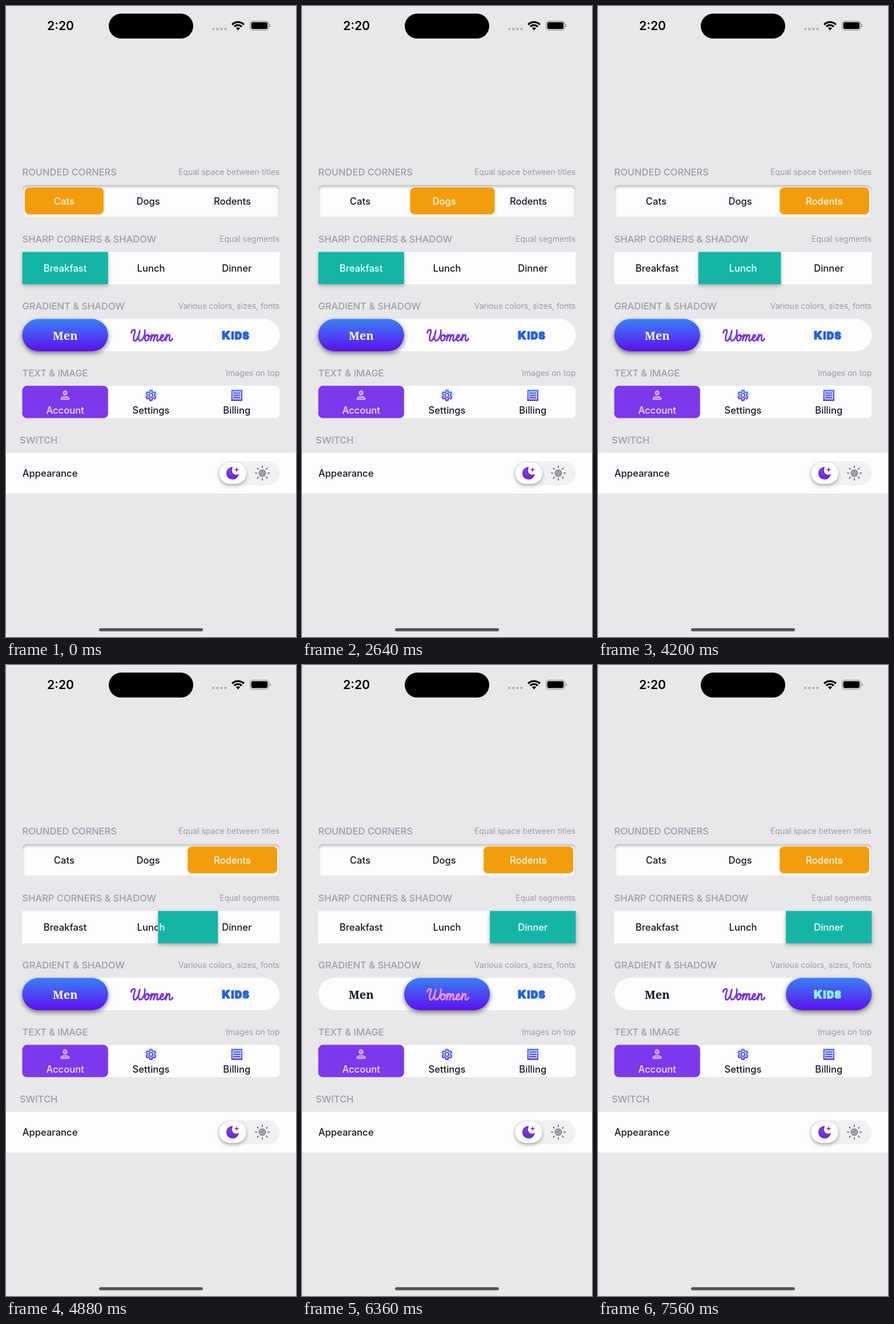
Recreate the animation shown at these times as an HTML page with a canvas. Size 508 by 1102 pixels, loop 8 s.

```html
<!DOCTYPE html>
<html lang="en">
<head>
<meta charset="utf-8">
<title>Segmented controls</title>
<style>
html, body { margin: 0; width: 100%; height: 100%; overflow: hidden; background: #e8e7e9; }
canvas { display: block; width: 508px; height: 1102px; }
</style>
</head>
<body>
<canvas id="stage"></canvas>
<script>
const W = 508, H = 1102, LOOP = 8000, STEP = 40;
const canvas = document.getElementById('stage');
const ratio = window.devicePixelRatio || 1;
canvas.width = W * ratio;
canvas.height = H * ratio;
const c = canvas.getContext('2d');

const INK = '#141925', MUTED = '#9a9ca9', PAPER = '#fdfcff';
const LABEL = '500 16.6px Inter, sans-serif';
const LEFT = 28.5, RIGHT = 479.5, SEG = (RIGHT - LEFT) / 3;
const CENTERS = [103.6, 254, 404.3];

// Each move: first visible step, start of its curve, duration, control, target segment
const MOVES = [
  { show: 1440, start: 1340, dur: 350, row: 'round', to: 1 },
  { show: 2640, start: 2554, dur: 350, row: 'round', to: 2 },
  { show: 3960, start: 3942, dur: 300, row: 'sharp', to: 1 },
  { show: 4760, start: 4742, dur: 300, row: 'sharp', to: 2 },
  { show: 6040, start: 6022, dur: 320, row: 'fancy', to: 1 },
  { show: 7240, start: 7222, dur: 320, row: 'fancy', to: 2 }
];

const lerp = (a, b, p) => a + (b - a) * p;

// cubic-bezier(.42, 0, .58, 1)
function easeInOut(x) {
  if (x <= 0) return 0;
  if (x >= 1) return 1;
  let lo = 0, hi = 1, s = .5;
  for (let i = 0; i < 20; i++) {
    s = (lo + hi) / 2;
    const bx = 1.26 * s * (1 - s) ** 2 + 1.74 * s * s * (1 - s) + s ** 3;
    if (bx < x) lo = s; else hi = s;
  }
  return 3 * s * s - 2 * s ** 3;
}

function position(row, t) {
  let pos = 0;
  for (const m of MOVES) {
    if (m.row === row && t >= m.show) pos = m.to - 1 + easeInOut((t - m.start) / m.dur);
  }
  return pos;
}

function box(x, y, w, h, r) {
  c.beginPath();
  c.roundRect(x, y, w, h, r);
}

function fillBox(x, y, w, h, r, fill) {
  box(x, y, w, h, r);
  c.fillStyle = fill;
  c.fill();
}

function disc(x, y, r, fill) {
  c.beginPath();
  c.arc(x, y, r, 0, Math.PI * 2);
  c.fillStyle = fill;
  c.fill();
}

function text(str, x, y, font, fill, align = 'center') {
  c.font = font;
  c.textAlign = align;
  c.fillStyle = fill;
  c.fillText(str, x, y);
}

function vertical(y0, y1, a, b) {
  const g = c.createLinearGradient(0, y0, 0, y1);
  g.addColorStop(0, a);
  g.addColorStop(1, b);
  return g;
}

function withShadow(dy, blur, alpha, draw) {
  c.save();
  c.shadowColor = `rgba(0,0,0,${alpha})`;
  c.shadowBlur = blur * ratio;
  c.shadowOffsetY = dy * ratio;
  draw();
  c.restore();
}

function header(title, note, y, x = LEFT) {
  text(title, x, y + 5.9, '500 16.5px Inter, sans-serif', MUTED, 'left');
  text(note, RIGHT - .3, y + 4.8, '400 14px Inter, sans-serif', MUTED, 'right');
}

// Dark labels, then the thumb, then light labels only inside the thumb
function control(x, y, w, h, r, paint, labels) {
  labels(false);
  paint();
  c.save();
  box(x, y, w, h, r);
  c.clip();
  labels(true);
  c.restore();
}

function statusBar() {
  text('2:20', 95.5, 42.4, '600 21.2px Inter, sans-serif', '#000');
  fillBox(180, 13.3, 148, 43.5, 21.8, '#000');
  for (let i = 0; i < 4; i++) fillBox(361 + i * 7.1, 38, 4.4, 4.4, 1.4, '#b4b3b6');

  c.strokeStyle = '#000';
  c.lineWidth = 3.3;
  for (const r of [14.4, 9.1]) {
    c.beginPath();
    c.arc(406.5, 42.5, r, -Math.PI * .755, -Math.PI * .245);
    c.stroke();
  }
  c.beginPath();
  c.moveTo(406.5, 42.5);
  c.arc(406.5, 42.5, 5.2, -Math.PI * .75, -Math.PI * .25);
  c.fillStyle = '#000';
  c.fill();

  box(427.6, 26.3, 32.6, 16, 5);
  c.strokeStyle = '#98979a';
  c.lineWidth = 1.3;
  c.stroke();
  fillBox(429.6, 28.3, 28.6, 12, 3.2, '#000');
  fillBox(461.6, 31.6, 1.8, 5.4, [0, 1.8, 1.8, 0], '#98979a');
}

function roundRow(t) {
  header('ROUNDED CORNERS', 'Equal space between titles', 290.5);
  const y = 312.8, h = 55.7, w = RIGHT - LEFT;
  fillBox(LEFT, y, w, h, 8, PAPER);
  c.save();
  box(LEFT, y, w, h, 8);
  c.clip();
  withShadow(2.5, 5, .3, () => {
    c.beginPath();
    c.rect(LEFT - 30, y - 30, w + 60, h + 60);
    c.roundRect(LEFT, y, w, h, 8);
    c.fillStyle = '#e8e7e9';
    c.fill('evenodd');
  });
  c.restore();

  const edges = [33, 171, 318.2, 475];
  const pos = position('round', t), i = Math.min(Math.floor(pos), 1), p = pos - i;
  const x = lerp(edges[i], edges[i + 1], p);
  const tw = lerp(edges[i + 1], edges[i + 2], p) - x;
  control(x, 317, tw, 47, 7.5,
    () => fillBox(x, 317, tw, 47, 7.5, '#f39d0a'),
    on => ['Cats', 'Dogs', 'Rodents'].forEach((s, k) =>
      text(s, [101.8, 249.2, 396.5][k], 346.6, LABEL, on ? '#fffaf0' : INK)));
}

function sharpRow(t) {
  header('SHARP CORNERS & SHADOW', 'Equal segments', 407.5);
  fillBox(LEFT, 429.5, RIGHT - LEFT, 56.5, 0, PAPER);
  // The thumb narrows halfway between segments
  const pos = position('sharp', t);
  const w = SEG * (1 - .31 * Math.abs(Math.sin(Math.PI * pos)));
  const x = LEFT + SEG * (pos + .5) - w / 2;
  control(x, 429.5, w, 56.5, 0,
    () => withShadow(3, 7, .3, () => fillBox(x, 429.5, w, 56.5, 0, '#14b5a7')),
    on => ['Breakfast', 'Lunch', 'Dinner'].forEach((s, k) =>
      text(s, CENTERS[k], 463.6, LABEL, on ? '#f2fffc' : INK)));
}

const SCRIPT = new Path2D(
  'M219.5 571C219.5 566 225 564 226 567C226 572 221 581 224.5 584.5C229 586 233 576 234.5 567' +
  'C232 575 231 583 234.5 584.5C240 584.5 244.5 573 243 566' +
  'M249 574.5C244 573 241 583 245 584.5C250 585 252 576 249 574.5C247.5 577 251 578 254 576' +
  'M255.5 574L253 584.5C255 578 258 573 260 574.5C261.5 577 258.5 582 258.5 584.5' +
  'C260 578 263 573 265 574.5C266.5 577 263 583 265 584.5C268 585 270 581 271 579.5' +
  'C275 580 277 575 274.5 574.3C271 573.5 269 583 272.5 584.5C276 585 278 582 280 579' +
  'M281.5 574L279.5 584.5C281 579 284 573 286.5 574.5C288 577 284.5 583 287 584.5C289 585 291 583 291.7 581');

function fancyLabels(on) {
  text('Men', CENTERS[0], 582.8, 'bold 20px "Noto Serif", serif', on ? '#fff' : '#111722');

  c.strokeStyle = on ? '#f78fe6' : '#7636e0';
  c.lineWidth = 2.8;
  c.lineCap = c.lineJoin = 'round';
  c.stroke(SCRIPT);
  c.lineCap = 'butt';

  const blue = on ? '#8cf3ee' : '#2460e6';
  c.letterSpacing = '1.5px';
  c.lineWidth = 1.3;
  c.strokeStyle = blue;
  [['K', 378.2, 19], ['IDS', 394.6, 16.8]].forEach(([s, x, size]) => {
    text(s, x, 582.3, `900 ${size}px Inter, sans-serif`, blue, 'left');
    c.strokeText(s, x, 582.3);
  });
  c.letterSpacing = '0px';
}

function fancyRow(t) {
  header('GRADIENT & SHADOW', 'Various colors, sizes, fonts', 524.5);
  fillBox(LEFT, 546.5, RIGHT - LEFT, 56.5, 28.2, PAPER);
  const x = LEFT + SEG * position('fancy', t);
  control(x, 546.5, SEG, 56.5, 28.2,
    () => withShadow(3.5, 8, .5, () =>
      fillBox(x, 546.5, SEG, 56.5, 28.2, vertical(546, 603, '#3882f6', '#5d10ee'))),
    fancyLabels);
}

function personIcon() {
  c.strokeStyle = '#dccbfb';
  c.fillStyle = '#a981f3';
  c.lineWidth = 1.7;
  c.beginPath();
  c.arc(103.6, 675.7, 3.3, 0, Math.PI * 2);
  c.fill();
  c.stroke();
  c.beginPath();
  c.moveTo(96.7, 687);
  c.lineTo(96.7, 685.4);
  c.bezierCurveTo(97, 681.2, 110.2, 681.2, 110.5, 685.4);
  c.lineTo(110.5, 687);
  c.closePath();
  c.fill();
  c.stroke();
}

function gearIcon(x, y) {
  const tone = vertical(y - 9, y + 9, '#3b7cf2', '#641ce0');
  c.beginPath();
  for (let i = 0; i < 6; i++) {
    const a = i * Math.PI / 3 - Math.PI / 2;
    [[-.36, 6.4], [-.23, 9], [.23, 9], [.36, 6.4]].forEach(([d, r]) =>
      c.lineTo(x + r * Math.cos(a + d), y + r * Math.sin(a + d)));
  }
  c.closePath();
  c.fillStyle = '#c9cffa';
  c.fill();
  c.strokeStyle = tone;
  c.lineWidth = 1.9;
  c.lineJoin = 'round';
  c.stroke();
  disc(x, y, 3.2, PAPER);
  c.stroke();
}

function receiptIcon(x, y) {
  const tone = vertical(y - 10, y + 10, '#3b7cf2', '#641ce0');
  const n = 12, step = 17.4 / n;
  c.beginPath();
  for (let i = 0; i <= n; i++) c.lineTo(x - 8.7 + i * step, y - 9.2 + (i % 2 ? 1.4 : 0));
  for (let i = n; i >= 0; i--) c.lineTo(x - 8.7 + i * step, y + 9.2 - (i % 2 ? 1.4 : 0));
  c.closePath();
  c.fillStyle = '#bcc9fa';
  c.fill();
  c.strokeStyle = tone;
  c.lineWidth = 1.8;
  c.stroke();
  c.fillStyle = tone;
  for (const d of [-4, 0, 4]) c.fillRect(x - 6, y + d - .9, 12, 1.8);
}

function imageRow() {
  header('TEXT & IMAGE', 'Images on top', 641.5);
  fillBox(LEFT, 663.3, RIGHT - LEFT, 56.5, 8, PAPER);
  fillBox(LEFT, 663.3, SEG, 56.5, 8, '#7d38eb');
  ['Account', 'Settings', 'Billing'].forEach((s, k) =>
    text(s, CENTERS[k], 712, LABEL, k ? INK : '#efe6fe'));
  personIcon();
  gearIcon(254, 680);
  receiptIcon(404.3, 680);
}

function moonIcon() {
  c.beginPath();
  c.arc(397, 816, 10.2, -Math.PI * .52, Math.PI * .06, true);
  c.bezierCurveTo(404, 822, 391, 818, 396.4, 805.8);
  c.closePath();
  c.fillStyle = vertical(805, 827, '#8a43ee', '#6a25da');
  c.fill();
  c.strokeStyle = '#5b1bb8';
  c.lineWidth = 1.3;
  c.stroke();

  c.beginPath();
  for (let i = 0; i < 8; i++) {
    const a = i * Math.PI / 4, r = i % 2 ? 1.5 : 4.8;
    c.lineTo(404 + r * Math.cos(a), 809.7 + r * Math.sin(a));
  }
  c.closePath();
  c.fillStyle = '#6a22d4';
  c.fill();
}

function sunIcon(x, y) {
  disc(x, y, 5.7, '#9da1ac');
  c.strokeStyle = '#707582';
  c.lineWidth = 1.2;
  c.stroke();
  c.lineWidth = 2;
  c.lineCap = 'round';
  c.beginPath();
  for (let i = 0; i < 8; i++) {
    const cos = Math.cos(i * Math.PI / 4), sin = Math.sin(i * Math.PI / 4);
    c.moveTo(x + cos * 9.8, y + sin * 9.8);
    c.lineTo(x + cos * 12.2, y + sin * 12.2);
  }
  c.stroke();
  c.lineCap = 'butt';
}

function switchRow() {
  header('SWITCH', '', 758.5, 24);
  fillBox(0, 780.3, W, 71, 0, PAPER);
  text('Appearance', 28.7, 821.8, LABEL, INK, 'left');
  fillBox(371, 795, 108.5, 42, 21, '#f1f0f3');
  withShadow(3, 6, .3, () => fillBox(373.3, 797.2, 47.5, 37.6, 18.8, PAPER));
  moonIcon();
  sunIcon(449, 815.8);
}

function draw(t) {
  c.setTransform(ratio, 0, 0, ratio, 0, 0);
  c.fillStyle = '#e8e7e9';
  c.fillRect(0, 0, W, H);
  statusBar();
  roundRow(t);
  sharpRow(t);
  fancyRow(t);
  imageRow();
  switchRow();
  fillBox(163, 1086.8, 182, 5.4, 2.7, vertical(1087, 1092, '#3f3f40', '#6c6c6d'));
}

const begin = performance.now();
function tick() {
  const t = (performance.now() - begin) % LOOP;
  draw(Math.floor(t / STEP) * STEP);
  requestAnimationFrame(tick);
}
tick();
</script>
</body>
</html>
```
